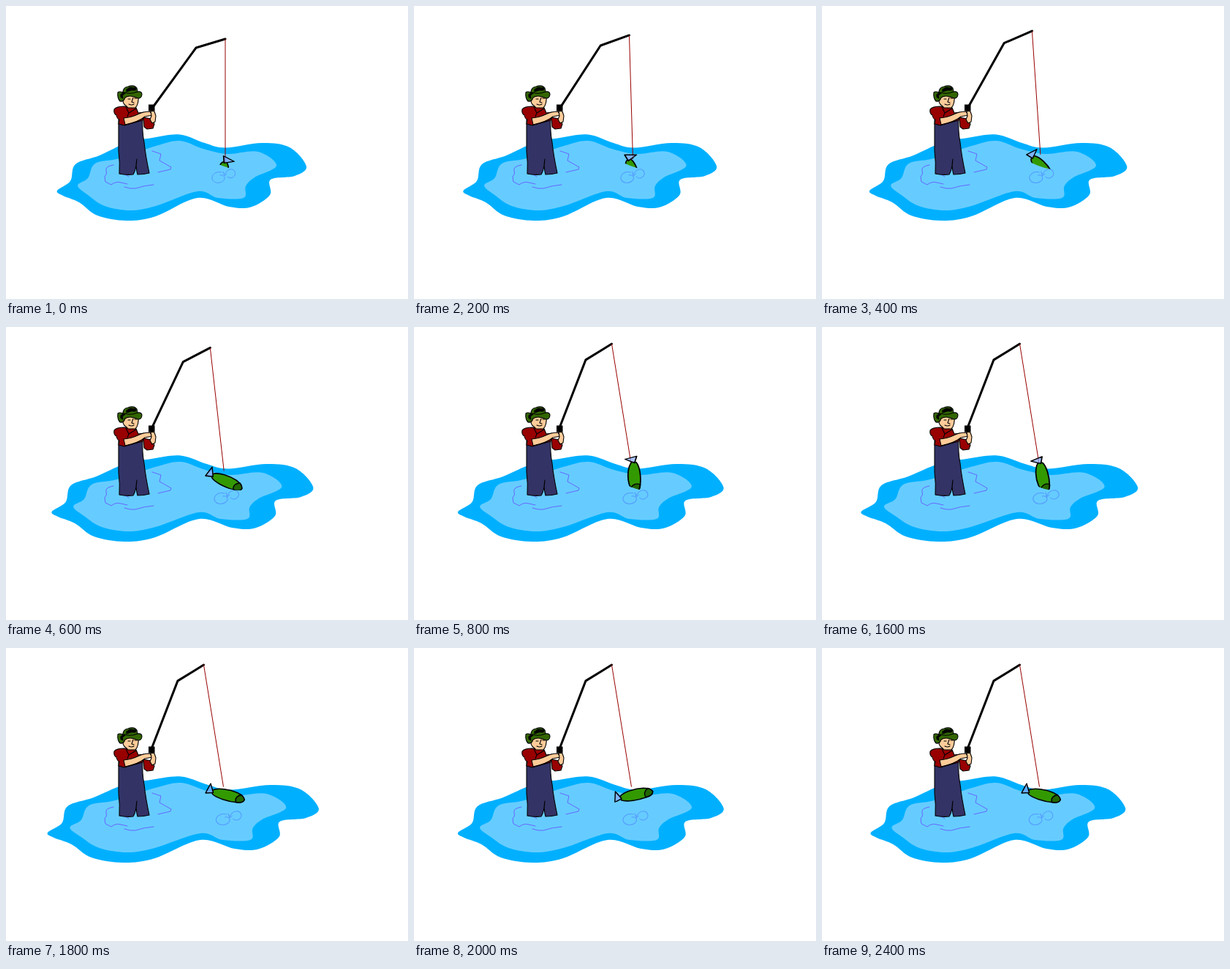
These frames come from a looping animation (550x400 px, 2600 ms). An HTML page:

```html
<!DOCTYPE html>
<html lang="en">
<head>
<meta charset="utf-8">
<title>Fisherman</title>
<style>
html, body { margin: 0; width: 100%; height: 100%; overflow: hidden; background: #fff; }
svg { display: block; width: 550px; height: 400px; }
.ink { stroke: #000; stroke-width: 1.1; stroke-linejoin: round; stroke-linecap: round; }
.wave { fill: none; stroke: #66f; stroke-width: 1; stroke-linecap: round; stroke-linejoin: round; }
.skin { fill: #fc9; }
.shirt { fill: #900; }
.hat { fill: #360; }
</style>
</head>
<body>
<svg viewBox="0 0 550 400">
  <defs>
    <clipPath id="surface"><path d="M240 150H350V224L312 222.500Q296 220 280 210L240 215Z"/></clipPath>
  </defs>

  <g id="pond">
    <path id="deep" fill="#00b0ff"/>
    <path id="shallow" fill="#6cf"/>
    <g class="wave" style="stroke:#59f">
      <path d="M295 227C286 225 281 231 282 236C284 242 292 243 297 239C301 235 299 230 293 231"/>
      <path d="M297 226L299 232L302 229M299 230C302 223 310 220 313 226C316 232 308 238 303 233"/>
    </g>
  </g>

  <g class="wave">
    <path d="M147 217Q135 219 137 225Q139 229 135 233L136 240L144 244Q150 239 157 241L166 243"/>
    <path d="M162 247Q170 250 177 249Q189 245 202 244"/>
    <path d="M156 229L163 230L168 233"/>
    <path d="M200 198L212 202L210 211L226 220L225 223L208 227"/>
  </g>

  <g class="ink">
    <path class="shirt" d="M188 152L199 154L203 161L201 167L193 168L189 165Z"/>
    <path fill="#336" d="M154 155L187 151Q186 172 189 186Q191 205 196 228Q189 230 180 230Q177 220 179 209Q178 224 174 230Q165 231 155 229Q156 214 154 198Z"/>
    <path class="shirt" d="M162 137Q151 137 148 141Q147 147 151 149Q152 154 155 155L154 161L162 163L187 156L189 145L181 146L178 139Z"/>
    <path class="skin" d="M160 126Q159 133 164 136L167 139L177 139Q182 134 181 122L163 121Z"/>
    <path fill="none" d="M174 125L172 131L175 132M168 134Q172 136 175 134M167 127L170 127M176 126L179 126"/>
    <path fill="none" d="M164 138L168 146L178 140M168 146L166 151"/>
    <path class="hat" d="M160 118Q160 111 167 110Q175 107 179 112L180 117Q186 116 186 121Q185 128 178 125Q169 121 163 125Q161 131 156 130Q152 126 153 118Q155 116 160 118Z"/>
    <path d="M165 114L170 111L178 112L177 115L171 115L165 117ZM157 121L161 118L163 119L159 122L160 126L157 124Z"/>
    <path fill="none" d="M163 118Q170 121 180 117"/>
    <path class="skin" d="M161 153Q172 152 180 148Q188 144 197 144L200 149L190 151Q182 158 163 162Z"/>
    <path class="skin" d="M198 143L203 144L205 150L204 158L200 160L197 155L199 150Z"/>
  </g>

  <path id="rod" fill="none" stroke="#000" stroke-width="3" stroke-linecap="round" stroke-linejoin="round"/>
  <rect x="195" y="134.500" width="8.500" height="9" fill="#000"/>
  <path id="line" fill="none" stroke="#900" stroke-width="1"/>

  <g clip-path="url(#surface)">
    <g id="fish" class="ink" style="stroke-width:1.500">
      <path fill="#390" d="M0 -2C7 -7 24 -8 35 -6Q44 -4 47 1Q46 6 37 6.500C25 8 8 7 1 3Z"/>
      <path fill="#260" d="M41 -4.500Q32 0 36 6.500Q46 6 47 1Q45 -3 41 -4.500Z"/>
      <path fill="#8af" fill-opacity=".7" d="M-4.500 -9.700L-8.500 3.700L2 1Z"/>
    </g>
  </g>
</svg>
<script>
const STEP = 200, COUNT = 13, LANDED = 4;
const $ = id => document.getElementById(id);

// Closed smooth curve through "x,y x,y ..." key points
function smooth(id, text) {
  const pts = text.split(" ").map(p => p.split(",").map(Number));
  const at = i => pts[(i + pts.length) % pts.length];
  const lean = (p, a, b) => p.map((v, k) => v + (b[k] - a[k]) / 6);
  const curves = pts.map((p, i) =>
    `C${lean(p, at(i - 1), at(i + 1))} ${lean(at(i + 1), at(i + 2), p)} ${at(i + 1)}`);
  $(id).setAttribute("d", `M${pts[0]}${curves.join("")}Z`);
}

smooth("deep", "70,252 88,239 95,216 128,204 165,187 200,180 238,175.5 " +
  "272,187 300,193.5 350,187 388,193 411,219 395,232 362,237 361,258 " +
  "335,274.5 305,274 262,262 205,287 165,293 125,286 100,268 78,259");
smooth("shallow", "98,245 112,235 122,215 155,208 205,191 238,184 " +
  "270,195 303,202 345,199 370,218 340,234 328,246 325,262 290,262 " +
  "262,253 205,273 170,279 135,273 112,258");

// Fish: x, y and angle of the tail end, then side shown
const flops = {
  upright: [300.5, 184, 88, -1],
  leaning: [298, 185, 80, -1],
  down: [282, 196, 13, 1],
  up: [282, 205, -13, 1]
};
const order = "upright up down upright leaning down up upright down".split(" ");

// The fish is hauled out evenly, then flops from pose to pose
const fishPose = n => n < LANDED
  ? [300 - 6 * n, 213 - 3.5 * n, 105 - 27.5 * n, 1]
  : flops[order[n - LANDED]];

const pivot = [201.1, 146.8];
function swing([x, y], degrees) {
  const a = -degrees * Math.PI / 180, dx = x - pivot[0], dy = y - pivot[1];
  return [pivot[0] + dx * Math.cos(a) - dy * Math.sin(a),
          pivot[1] + dx * Math.sin(a) + dy * Math.cos(a)];
}

function draw(ms) {
  const n = Math.floor(ms / STEP) % COUNT;

  const swell = Math.min(1, n / 7, (COUNT - n) / 5.2), mid = 218.6;
  $("pond").setAttribute("transform",
    `translate(${mid}) scale(${1 + .114 * swell} 1) translate(${-mid})`);

  const pull = Math.min(1, n / LANDED) ** 1.15;
  const [grip, bend, tip] = [[202.5, 136], [260, 57], [300, 45]].map(p => swing(p, 14.9 * pull));
  const hook = [300 - 2.5 * pull, 214 - 24.5 * pull];
  $("rod").setAttribute("d", `M${grip}L${bend}L${tip}`);
  $("line").setAttribute("d", `M${tip}L${hook}`);

  // Steeper fish look shorter and broader
  const [x, y, angle, side] = fishPose(n);
  const steep = Math.abs(Math.sin(angle * Math.PI / 180));
  $("fish").setAttribute("transform",
    `translate(${x} ${y}) rotate(${angle}) scale(${1 - .13 * steep} ${side * (1 + .2 * steep)})`);
}

const start = performance.now();
function tick() {
  draw(performance.now() - start);
  requestAnimationFrame(tick);
}
tick();
</script>
</body>
</html>
```
